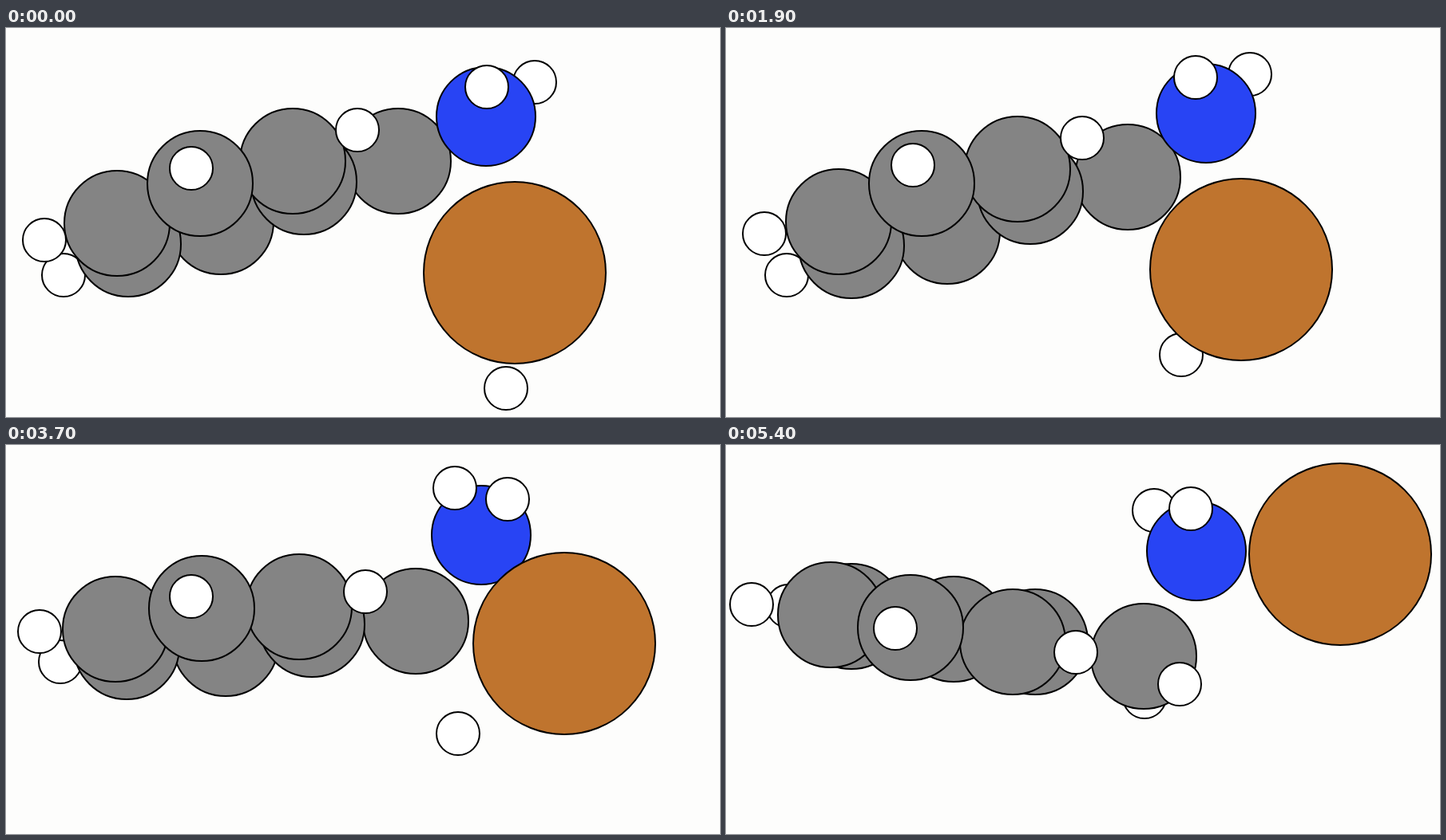
An HTML page with a canvas that plays this animation: 894 px wide and 488 px high, repeating every 5500 ms.

```html
<!DOCTYPE html>
<html lang="en">
<head>
<meta charset="utf-8">
<title>Molecule reaction</title>
<style>
  html, body { margin: 0; width: 100%; height: 100%; overflow: hidden; background: #fdfdfc; }
  canvas { display: block; }
</style>
</head>
<body>
<canvas id="stage" width="894" height="488"></canvas>
<script>
const ctx = document.getElementById('stage').getContext('2d');
const LOOP = 5500, STEP = 100;
const CH_REACH = 1.77; // distance of a ring hydrogen, in ring radii
const BREAK = 3.3, SETTLE = 4.1, END = 5.4; // phases in seconds
const TIMES = [0, 1, 2.5, BREAK, SETTLE, END];

const KINDS = {
  C: { r: 66, fill: '#848484' },
  N: { r: 62, fill: '#2844f4' },
  X: { r: 114, fill: '#bf742e' },
  H: { r: 27, fill: '#fff' }
};

// The ring is a flat hexagon seen at an angle: a centre and two projected axes.
const centre = [[256, 219], [259, 221.5], [261.7, 226.3], [261.3, 227.3], [255.3, 228.7], [258.3, 230.3]];
const axisP = [[117, -26.5], [118, -24], [121, -15], [122, -10], [127, 14.3], [128, 17]];
const axisQ = [[52, -44], [50, -48], [52, -43], [55, -36], [49, -4], [43.5, 9]];

const nitrogen = [[601, 111], [603, 109], [599, 105], [597, 107], [593, 131], [589, 133]];
const amineA = [[662, 68], [662, 62], [652, 56], [640, 54], [596, 100], [582, 80]];
const amineB = [[602, 74], [598, 70], [582, 56], [570, 52], [544, 62], [536, 82]];
const halogen = [[637, 307], [635, 305], [651, 301], [671, 293], [771, 139], [769, 137]];
const methylene = [[626, 452], [586, 436], [558, 392], [558, 368], [588, 346], [568, 300]];

// Speeds up through the bond break, then settles.
function ease(u, start) {
  if (start === BREAK) {
    const w = u ** 1.5;
    return w * w * (3 - 2 * w);
  }
  return start === SETTLE ? 1 - (1 - u) ** 1.6 : u;
}

function along(path, t) {
  let i = 0;
  while (i < TIMES.length - 2 && t >= TIMES[i + 1]) i++;
  const p = ease((t - TIMES[i]) / (TIMES[i + 1] - TIMES[i]), TIMES[i]);
  return path[i].map((v, k) => v + (path[i + 1][k] - v) * p);
}

// Every atom at time t; a larger z is nearer the viewer.
function molecule(t) {
  const atoms = [];
  const add = (kind, z, [x, y]) => atoms.push({ ...KINDS[kind], z, x, y });

  const c = along(centre, t), p = along(axisP, t), q = along(axisQ, t);
  const onRing = (cos, sin) => c.map((v, k) => v + p[k] * cos + q[k] * sin);
  for (let i = 0; i < 6; i++) {
    const cos = Math.cos(i * Math.PI / 3), sin = Math.sin(i * Math.PI / 3);
    const z = sin - 0.1 * cos;
    add('C', z, onRing(cos, sin));
    if (i) add('H', z * CH_REACH, onRing(cos * CH_REACH, sin * CH_REACH));
  }

  // The side-chain carbon drifts outwards; its second hydrogen swings into view.
  const side = onRing(2 + 0.07 * t / END, 0);
  const swing = Math.max(0, (t - SETTLE) / (END - SETTLE));
  add('C', -0.2, side);
  add('H', -0.6, [side[0], side[1] + 50 * swing]);
  add('H', t - SETTLE, along(methylene, t));

  add('N', -0.15, along(nitrogen, t));
  add('H', t - 3.8, along(amineA, t));
  add('H', 3.8 - t, along(amineB, t));

  const [x, y] = along(halogen, t);
  const sway = Math.sin(Math.PI * swing);
  add('X', 1, [x - 3 * sway, y - 7 * sway]);
  return atoms.sort((a, b) => a.z - b.z);
}

// Positions lie on a two-pixel grid.
function snap(v, r) {
  const odd = r > 27 ? 1 : 0;
  return 2 * Math.round((v - odd) / 2) + odd;
}

function draw(t) {
  ctx.fillStyle = '#fdfdfc';
  ctx.fillRect(0, 0, 894, 488);
  ctx.lineWidth = 2;
  ctx.strokeStyle = '#000';
  for (const { x, y, r, fill } of molecule(t)) {
    ctx.beginPath();
    ctx.arc(snap(x, r), snap(y, r), r, 0, 2 * Math.PI);
    ctx.fillStyle = fill;
    ctx.fill();
    ctx.stroke();
  }
}

function tick() {
  draw(Math.floor(performance.now() % LOOP / STEP) * STEP / 1000);
  requestAnimationFrame(tick);
}
tick();
</script>
</body>
</html>
```
